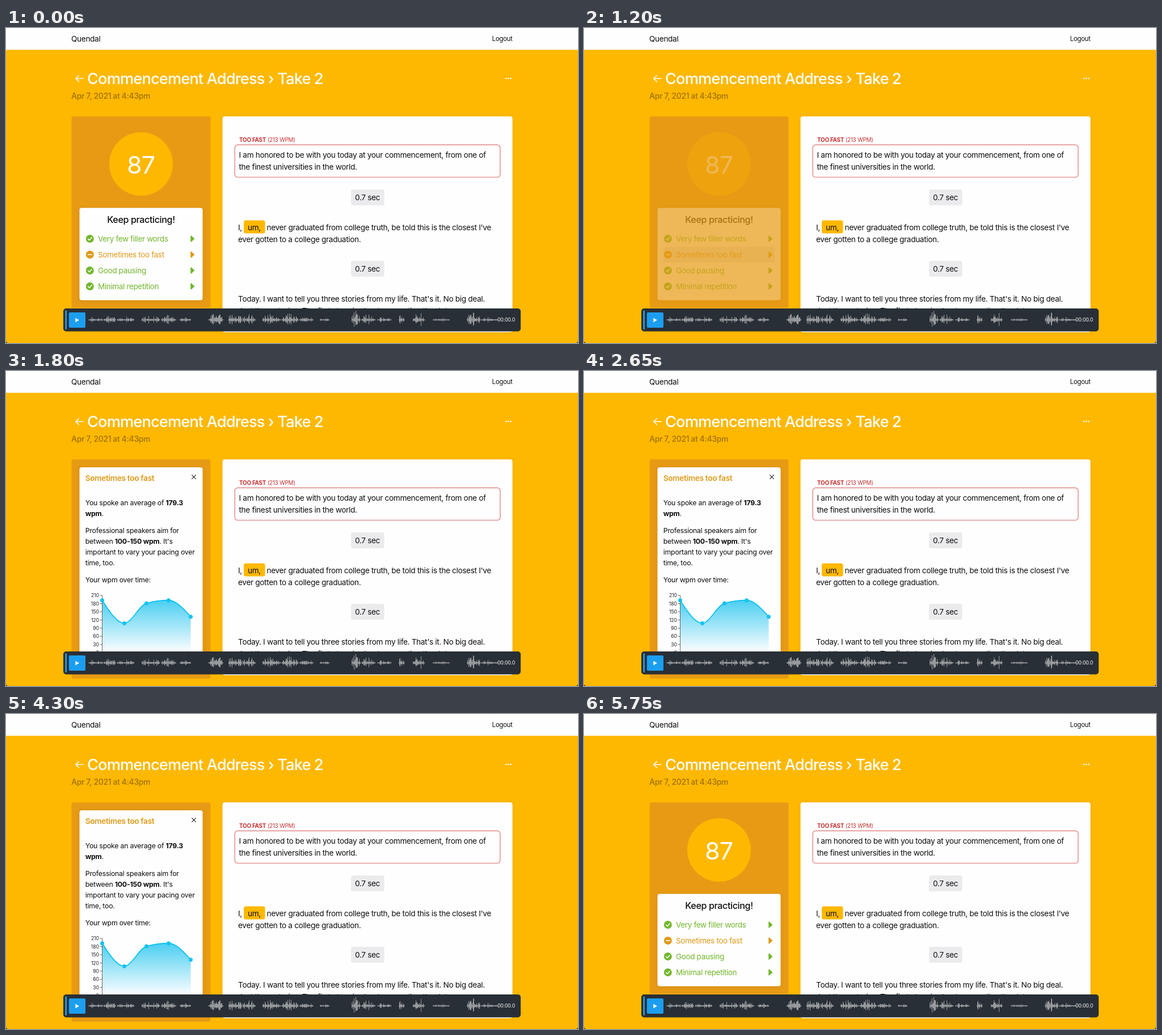
An HTML page with a canvas that plays this animation: 1008x556 px, repeating every 5.8 s.

```html
<!DOCTYPE html>
<html lang="en">
<head>
<meta charset="utf-8">
<title>Take review</title>
<style>
  html, body { margin: 0; width: 100%; height: 100%; overflow: hidden; background: #ffb800; }
  canvas { display: block; width: 100%; height: 100%; }
</style>
</head>
<body>
<canvas id="stage"></canvas>
<script>
const W = 1008, H = 556, LOOP = 5800;
const YELLOW = '#ffb800', AMBER = '#e79b14', INK = '#0d0e10', GREEN = '#72b72c', CYAN = '#13c3f0';
const HOVER = '#ebebed';
const TIME = { rowHover: 700, listOut: 1140, enter: 1226, closeHover: 4900, leave: 5140, listIn: 5390 };
const SLIDE = 250;

const dpr = Math.max(1, window.devicePixelRatio || 1);

function makeLayer(canvas) {
  canvas.width = Math.round(W * dpr);
  canvas.height = Math.round(H * dpr);
  const c = canvas.getContext('2d');
  c.scale(dpr, dpr);
  return c;
}

const screen = makeLayer(document.getElementById('stage'));
const layer = makeLayer(document.createElement('canvas'));
let ctx = screen;

const clamp = v => Math.min(1, Math.max(0, v));

// ---- drawing helpers ----

function box(x, y, w, h, r, fill) {
  ctx.beginPath();
  ctx.roundRect(x, y, w, h, r);
  ctx.fillStyle = fill;
  ctx.fill();
}

function card(x, y, w, h, r, shadow = 0.16) {
  ctx.save();
  ctx.shadowColor = `rgba(90,50,0,${shadow})`;
  ctx.shadowBlur = 6 * dpr;
  ctx.shadowOffsetY = dpr;
  box(x, y, w, h, r, '#fffeff');
  ctx.restore();
}

function disc(x, y, r, fill) {
  ctx.beginPath();
  ctx.arc(x, y, r, 0, Math.PI * 2);
  ctx.fillStyle = fill;
  ctx.fill();
}

function line(points, color, width) {
  ctx.beginPath();
  points.forEach(([x, y]) => ctx.lineTo(x, y));
  ctx.strokeStyle = color;
  ctx.lineWidth = width;
  ctx.stroke();
}

function text(str, x, y, { size = 13.6, weight = 400, color = INK, align = 'left', track = -0.024 } = {}) {
  ctx.font = `${weight} ${size}px Inter, Roboto, sans-serif`;
  ctx.letterSpacing = `${size * track}px`;
  ctx.textAlign = align;
  ctx.fillStyle = color;
  ctx.fillText(str, x, y);
  return ctx.measureText(str).width;
}

// Text between asterisks is bold.
function richText(str, x, y, style) {
  str.split('*').forEach((part, i) => {
    if (part) x += text(part, x, y, { ...style, weight: i % 2 ? 700 : 400 });
  });
}

// Draws a group with one shared opacity.
function fade(alpha, draw) {
  if (alpha >= 1) return draw();
  if (alpha <= 0) return;
  layer.clearRect(0, 0, W, H);
  ctx = layer;
  draw();
  ctx = screen;
  ctx.save();
  ctx.globalAlpha *= alpha;
  ctx.drawImage(layer.canvas, 0, 0, W, H);
  ctx.restore();
}

// ---- page ----

function drawHeader() {
  box(0, 0, W, 38.5, 0, '#fffeff');
  text('Quendal', 115, 24);
  text('Logout', 892.5, 23.2, { size: 11.4, align: 'right' });

  ctx.lineCap = ctx.lineJoin = 'round';
  line([[136, 89.2], [123, 89.2]], '#fff', 1.5);
  line([[128.3, 83.8], [122.9, 89.2], [128.3, 94.6]], '#fff', 1.5);
  text('Commencement Address › Take 2', 143, 99.4, { size: 27.3, weight: 500, color: '#fff', track: -0.0337 });
  text('Apr 7, 2021 at 4:43pm', 115, 124.6, { size: 13.8, weight: 600, color: '#a97900' });
  for (let i = 0; i < 3; i++) disc(881.2 + i * 4.1, 89, 1.35, '#fff');
}

function drawBadge(y) {
  box(608, y, 58.5, 28, 3, HOVER);
  text('0.7 sec', 637, y + 18.8, { align: 'center' });
}

function drawTranscript() {
  card(381.5, 156, 511, 381, 4, 0.08);
  const red = '#c5302f';
  const labelWidth = text('TOO FAST', 411, 200.8, { size: 9.9, weight: 700, color: red });
  text('(213 WPM)', 411 + labelWidth + 2.6, 200.8, { size: 9.9, color: red });
  ctx.beginPath();
  ctx.roundRect(403.2, 206.2, 467.6, 57.2, 5);
  ctx.strokeStyle = '#df8a86';
  ctx.lineWidth = 1.4;
  ctx.stroke();
  text('I am honored to be with you today at your commencement, from one of', 410.5, 229.2);
  text('the finest universities in the world.', 410.5, 250.2);

  drawBadge(285);
  text('I,', 409, 356.7);
  box(419, 339.5, 37.5, 23, 3.5, YELLOW);
  text('um,', 426, 356.7);
  text("never graduated from college truth, be told this is the closest I've", 459.5, 356.7);
  text('ever gotten to a college graduation.', 409, 377.7);
  drawBadge(411);
  text("Today. I want to tell you three stories from my life. That's it. No big deal.", 409, 482.7);
  text('Just three stories. The first story is about connecting the dots.', 409, 503.7);
}

// ---- score list ----

const ROWS = ['Very few filler words', 'Sometimes too fast', 'Good pausing', 'Minimal repetition'];

function drawRow(label, i, hovered) {
  const y = 372 + i * 28, warn = i === 1;
  const color = warn ? '#df9a18' : GREEN;
  if (hovered) box(140, y - 14, 196.5, 28, 2, HOVER);
  disc(147.8, y, 7, color);
  const mark = warn ? [[144.3, y], [151.3, y]] : [[144.6, y + 0.2], [147, y + 2.6], [151.2, y - 2.2]];
  line(mark, '#fff', 1.5);
  text(label, 162, y + 4.9, { color, track: -0.029 });
  ctx.beginPath();
  ctx.moveTo(326, y - 4.8);
  ctx.lineTo(331.4, y);
  ctx.lineTo(326, y + 4.8);
  ctx.closePath();
  ctx.fillStyle = ctx.strokeStyle = color;
  ctx.lineWidth = 1.6;
  ctx.fill();
  ctx.stroke();
}

function drawList(hover) {
  ctx.lineCap = ctx.lineJoin = 'round';
  disc(238, 240, 56, YELLOW);
  text('87', 237.5, 256.8, { size: 43, color: '#fff', align: 'center' });
  card(129.5, 317.5, 217, 163, 4);
  text('Keep practicing!', 238, 343.8, { size: 16.1, weight: 500, align: 'center' });
  ROWS.forEach((label, i) => drawRow(label, i, hover && i === 1));
}

// ---- detail panel ----

const WRAPS = {
  enter: ['You spoke an average of', '*179.3 wpm*.', 'Professional speakers aim for',
    "between *100-150 wpm*. It's", 'important to vary your pacing', 'over time, too.'],
  rest: ['You spoke an average of *179.3*', '*wpm*.', 'Professional speakers aim for',
    "between *100-150 wpm*. It's", 'important to vary your pacing over', 'time, too.'],
  leave: ['You spoke an average of', '*179.3 wpm*.', 'Professional speakers aim',
    'for between *100-150 wpm*.', "It's important to vary your", 'pacing over time, too.']
};
const LINE_Y = [67, 86, 116, 135, 154, 173];
const WPM = [192, 108, 181, 192, 132];

// Slopes for a monotone cubic through evenly spaced points.
function slopes(ys, dx) {
  const s = ys.slice(1).map((y, i) => (y - ys[i]) / dx);
  const m = ys.map((_, i) => {
    const a = s[i - 1], b = s[i];
    if (a === undefined || b === undefined || a * b <= 0) return 0;
    return 2 * Math.sign(a) * Math.min(Math.abs(a), Math.abs(b), Math.abs(a + b) / 4);
  });
  const n = ys.length - 1;
  m[0] = (3 * s[0] - m[1]) / 2;
  m[n] = (3 * s[n - 1] - m[n - 1]) / 2;
  return m;
}

function drawChart(x, top, step) {
  const yOf = v => top + (210 - v) * 14.45 / 30;
  const base = yOf(0), ys = WPM.map(yOf), m = slopes(ys, step);
  const right = x + step * 4;

  const curve = new Path2D();
  curve.moveTo(x, ys[0]);
  for (let i = 1; i < ys.length; i++) {
    const x0 = x + step * (i - 1), x1 = x0 + step, d = step / 3;
    curve.bezierCurveTo(x0 + d, ys[i - 1] + m[i - 1] * d, x1 - d, ys[i] - m[i] * d, x1, ys[i]);
  }
  const area = new Path2D(curve);
  area.lineTo(right, base);
  area.lineTo(x, base);
  area.closePath();

  const shade = ctx.createLinearGradient(0, ys[0], 0, base);
  shade.addColorStop(0, 'rgba(30,195,238,.8)');
  shade.addColorStop(1, 'rgba(30,195,238,0)');
  ctx.fillStyle = shade;
  ctx.fill(area);

  line([[x, top], [x, base]], '#555', 0.9);
  for (let v = 210; v >= 0; v -= 30) {
    line([[x - 4, yOf(v)], [x, yOf(v)]], '#555', 0.9);
    text(String(v), x - 5.7, yOf(v) + 3.1, { size: 8.6, align: 'right', track: -0.01, color: '#222' });
  }
  ctx.strokeStyle = CYAN;
  ctx.lineWidth = 1.9;
  ctx.stroke(curve);
  ys.forEach((y, i) => disc(x + step * i, y, 3.5, CYAN));
}

function drawPanel({ x, y, w, wrap, axis, step }) {
  ctx.lineCap = 'butt';
  card(x, y, w, wrap === 'rest' ? 359 : 380, 4);
  text('Sometimes too fast', x + 10.2, y + 23.8, { size: 13.7, weight: 600, color: '#df9a18' });
  const style = { size: 12.3, track: -0.019 };
  WRAPS[wrap].forEach((str, i) => richText(str, x + 10.3, y + LINE_Y[i], style));
  text('Your wpm over time:', x + 10.3, y + 203, style);
  drawChart(x + axis, y + 226.1, step);
}

function panelAt(t) {
  const inP = (t - TIME.enter) / SLIDE, outP = (t - TIME.leave) / SLIDE;
  if (inP < 1) {
    const u = (1 - clamp(inP)) ** 3;
    return { alpha: 1 - u, bottom: 530, x: 128, y: 170 + 184 * u, w: 193, wrap: 'enter', axis: 37, step: 34 };
  }
  if (outP > 0) {
    const p = clamp(outP);
    return { alpha: 1 - p ** 2.8, bottom: 545.5, x: 127.4, y: 170 + 296 * p * p, w: 185.6, wrap: 'leave', axis: 39.7, step: 38.9 };
  }
  return { alpha: 1, bottom: 543, x: 129.5, y: 170, w: 217, wrap: 'rest', axis: 40, step: 39 };
}

function drawClose(hovered) {
  if (hovered) box(322.5, 177.5, 17, 19, 1, '#e6dfd0');
  ctx.lineCap = 'round';
  line([[327.7, 183.7], [334.3, 190.3]], '#222', 1.2);
  line([[334.3, 183.7], [327.7, 190.3]], '#222', 1.2);
}

function drawSidebar(t) {
  const detail = t >= TIME.enter && t < TIME.listIn;
  const panel = detail ? panelAt(t) : null;
  const bottom = detail ? panel.bottom : 494;
  box(115.5, 156, 245, bottom - 156, 4, AMBER);
  ctx.save();
  ctx.beginPath();
  ctx.roundRect(115.5, 156, 245, bottom - 156, 4);
  ctx.clip();
  if (detail) {
    fade(panel.alpha, () => drawPanel(panel));
    drawClose(t >= TIME.closeHover);
  } else {
    const alpha = t < TIME.enter
      ? 1 - clamp((t - TIME.listOut) / (TIME.enter - TIME.listOut))
      : clamp((t - TIME.listIn) / 180);
    fade(alpha, () => drawList(t >= TIME.rowHover && t < TIME.enter));
  }
  ctx.restore();
}

// ---- player ----

// Bursts of speech: start, end, loudness.
const BURSTS = [
  [145, 170, 6], [171, 194, 7], [196, 226, 6], [239, 272, 8], [274, 300, 9], [306, 326, 4],
  [357, 383, 13], [392, 416, 15], [417, 440, 11], [452, 484, 12], [485, 515, 12], [516, 542, 5],
  [553, 570, 3], [609, 625, 17], [626, 651, 10], [654, 679, 5], [692, 702, 11], [717, 738, 14],
  [752, 782, 3], [812, 836, 14], [837, 868, 5]
];

function drawWave() {
  let seed = 77;
  const random = () => (seed = (seed * 16807) % 2147483647) / 2147483647;
  ctx.fillStyle = '#a4a7aa';
  for (const [from, to, loud] of BURSTS) {
    for (let x = from; x < to; x++) {
      const swell = 0.3 + 0.7 * Math.sin(Math.PI * (x - from + 0.5) / (to - from));
      const up = 0.5 + loud * swell * (0.1 + 0.9 * random() ** 2.4);
      const down = up * (0.6 + 0.3 * random());
      ctx.fillRect(x, 515.3 - up, 0.9, up + down);
    }
  }
}

function drawPlayer() {
  box(101, 495, 806, 40.5, 5, '#292f36');
  box(104.3, 498.5, 2.8, 33.5, 1, '#2b9be0');
  box(110.8, 502, 29.2, 27, 2, '#1c9ef0');
  ctx.beginPath();
  ctx.moveTo(122.3, 511.8);
  ctx.lineTo(128.8, 515.6);
  ctx.lineTo(122.3, 519.4);
  ctx.fillStyle = '#fff';
  ctx.fill();
  drawWave();
  text('00:00.0', 897, 518.3, { size: 8.7, color: '#fff', align: 'right', track: -0.015 });
}

function drawCorners() {
  ctx.fillStyle = '#1b1505';
  for (const [x, side] of [[0, 1], [W, -1]]) {
    ctx.beginPath();
    ctx.moveTo(x, H - 4);
    ctx.quadraticCurveTo(x, H, x + side * 4, H);
    ctx.lineTo(x, H);
    ctx.fill();
  }
}

function draw(t) {
  box(0, 0, W, H, 0, YELLOW);
  drawHeader();
  drawTranscript();
  drawSidebar(t);
  drawPlayer();
  drawCorners();
}

const start = performance.now();
function tick() {
  draw((performance.now() - start) % LOOP);
  requestAnimationFrame(tick);
}
tick();
</script>
</body>
</html>
```
